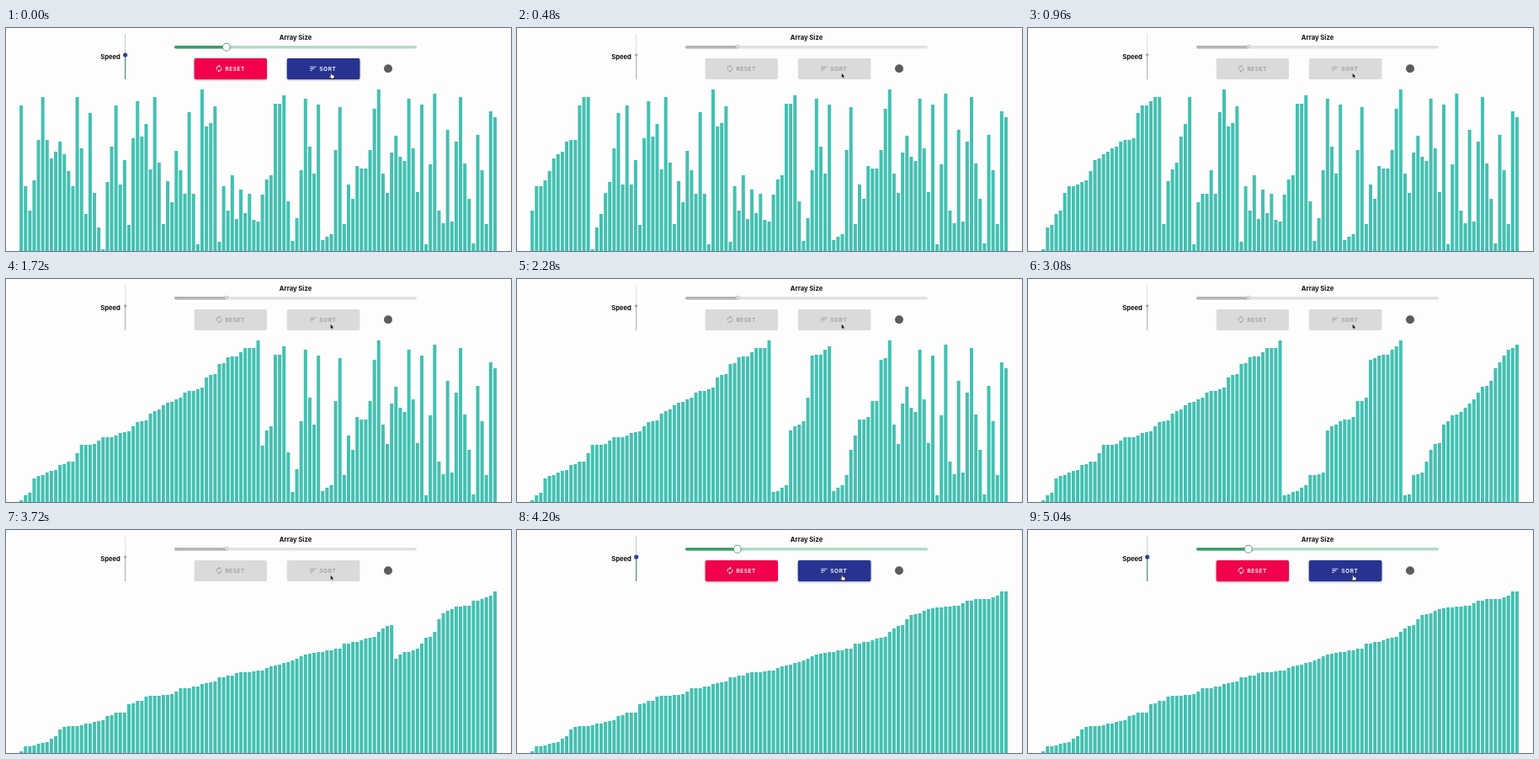
Animation, 600 px wide and 265 px high, one loop 5080 ms. Source, as an HTML page:

```html
<!DOCTYPE html>
<html lang="en">
<head>
<meta charset="utf-8">
<title>Merge sort</title>
<style>
  html, body { margin: 0; width: 100%; height: 100%; overflow: hidden; background: #fdfdfd; }
  svg { display: block; width: 100vw; height: 100vh; }
  text { font-family: Inter, Roboto, sans-serif; }
  .label { font-weight: 700; font-size: 7.65px; fill: #111; text-anchor: middle; }
  .caption { font-weight: 600; font-size: 6.6px; letter-spacing: .5px; }
  .raised { filter: drop-shadow(0 1px 1px #0005); }
</style>
</head>
<body>
<svg viewBox="0 0 600 265">
  <defs>
    <path id="renew" transform="translate(248 43.2) scale(.42)" d="M12 6v3l4-4-4-4v3c-4.42 0-8 3.58-8 8 0 1.57.46 3.03 1.24 4.26L6.7 14.8c-.45-.83-.7-1.79-.7-2.8 0-3.31 2.69-6 6-6zm6.76 1.74L17.3 9.2c.44.84.7 1.79.7 2.8 0 3.31-2.69 6-6 6v-3l-4 4 4 4v-3c4.42 0 8-3.58 8-8 0-1.57-.46-3.03-1.24-4.26z"/>
    <path id="lines" transform="translate(360 43.2) scale(.42)" d="M3 18h6v-2H3v2zM3 6v2h18V6H3zm0 7h12v-2H3v2z"/>
    <rect id="resetBox" x="223.7" y="36" width="86.3" height="25" rx="2"/>
    <rect id="sortBox" x="333.8" y="36" width="86.6" height="25" rx="2"/>
    <g id="captions">
      <use href="#renew"/><text class="caption" x="260.5" y="50.8">RESET</text>
      <use href="#lines"/><text class="caption" x="372.3" y="50.8">SORT</text>
    </g>
  </defs>

  <g id="bars"></g>

  <text class="label" x="124" y="36.8">Speed</text>
  <text class="label" x="344" y="14.4">Array Size</text>
  <circle cx="454" cy="48.3" r="5" fill="#5b5b60"/>

  <g fill="#dadada">
    <use href="#resetBox"/><use href="#sortBox"/>
    <use href="#captions" fill="#9c9c9c"/>
  </g>
  <g id="activeButtons">
    <use href="#resetBox" class="raised" fill="#f1004c"/>
    <use href="#sortBox" class="raised" fill="#283391"/>
    <use href="#captions" fill="#fff"/>
  </g>

  <g id="idle">
    <rect x="200" y="21" width="288" height="3.4" rx="1.7" fill="#afdcc5"/>
    <rect x="200" y="21" width="62" height="3.4" rx="1.7" fill="#3c9b69"/>
    <circle cx="261.8" cy="22.7" r="4.5" fill="#fff" stroke="#5f9f80" stroke-width="1.1"/>
    <path d="M141.7 7V32" stroke="#b9cfc6"/>
    <path d="M141.7 32V61" stroke="#4f8a72" stroke-width="1.2"/>
    <circle cx="141.7" cy="32" r="2.6" fill="#2c3f9c"/>
    <path d="M385.2 53.6q.9-.6 1.3.3l.6 1.6 2.2.7q1 .4.7 1.6l-.5 2.2h-3.2l-2.2-2.6q0-.9 1-.5l.7.5z" fill="#fff" stroke="#111" stroke-width=".6"/>
  </g>
  <g id="busy">
    <rect x="200" y="21" width="288" height="3.4" rx="1.7" fill="#e1e1e1"/>
    <rect x="200" y="21" width="62" height="3.4" rx="1.7" fill="#b4b4b4"/>
    <circle cx="261.8" cy="22" r="1.8" fill="#fff" stroke="#b0b0b0" stroke-width=".9"/>
    <path d="M141.7 7V32" stroke="#dedede"/>
    <path d="M141.7 32V61" stroke="#b4b4b4" stroke-width="1.2"/>
    <circle cx="141.7" cy="32" r="1.7" fill="#a8a8a8"/>
    <path d="M385.6 53.6v5.6l1.3-1.1.9 2 1-.5-.9-1.9h1.6z" fill="#111" stroke="#fff" stroke-width=".3"/>
  </g>
</svg>
<script>
const LOOP = 5080, PRESS = 40, SORT_START = 83, SORT_END = 3840, FADE = 250;
const TEAL = '#43c0b1', YELLOW = '#fcca58';

// Top edge of every bar before sorting; a larger value is a shorter bar.
const tops = [
  92, 188, 217, 181, 133, 82, 133, 155, 147, 135, 150, 170, 188, 82, 143, 221, 101, 196, 237,
  263, 183, 141, 92, 186, 157, 234, 131, 87, 129, 114, 168, 82, 160, 233, 182, 207, 146, 169,
  197, 100, 197, 257, 73, 117, 113, 93, 254, 188, 217, 175, 227, 192, 220, 197, 228, 230, 198,
  180, 175, 90, 90, 80, 206, 253, 226, 169, 84, 141, 173, 91, 252, 248, 245, 145, 94, 233, 186,
  203, 164, 167, 167, 145, 96, 73, 173, 196, 148, 128, 153, 158, 84, 143, 195, 91, 257, 162, 78,
  217, 232, 121, 230, 135, 82, 161, 203, 256, 127, 169, 233, 99, 106
];

// Each step compares bars i and j, then writes a value at k.
const steps = [];
function mergeSort(list, from, to) {
  if (from === to) return;
  const mid = (from + to) >> 1;
  mergeSort(list, from, mid);
  mergeSort(list, mid + 1, to);
  const copy = list.slice();
  let i = from, j = mid + 1;
  for (let k = from; k <= to; k++) {
    const leftOpen = i <= mid, rightOpen = j <= to;
    const takeLeft = leftOpen && (!rightOpen || copy[i] >= copy[j]);
    const pair = [leftOpen ? i : j, rightOpen ? j : i];
    list[k] = copy[takeLeft ? i++ : j++];
    steps.push({ pair, k, value: list[k] });
  }
}
mergeSort(tops.slice(), 0, tops.length - 1);

const byId = id => document.getElementById(id);
const bars = tops.map((_, i) => {
  const bar = document.createElementNS('http://www.w3.org/2000/svg', 'rect');
  bar.setAttribute('x', 16.1 + 5.117 * i);
  bar.setAttribute('width', 4);
  return byId('bars').appendChild(bar);
});

function drawBars(t) {
  const u = Math.max(0, t - SORT_START);
  const progress = Math.min(steps.length, 0.19742 * u + 1.333e-6 * u * u);
  const current = Math.floor(progress), phase = progress - current;
  const written = current + (phase >= 2 / 3 ? 1 : 0);
  const now = tops.slice();
  for (let s = 0; s < written; s++) now[steps[s].k] = steps[s].value;
  const lit = u > 0 && current < steps.length && phase < 1 / 3 ? steps[current].pair : [];
  bars.forEach((bar, i) => {
    bar.setAttribute('y', now[i]);
    bar.setAttribute('height', 265 - now[i]);
    bar.setAttribute('fill', lit.includes(i) ? YELLOW : TEAL);
  });
}

const ramp = (t, start) => Math.min(1, Math.max(0, (t - start) / FADE));
const ease = x => x * x * (3 - 2 * x);

function frame(ms) {
  const t = ms % LOOP;
  const busy = t >= PRESS && t < SORT_END;
  drawBars(t);
  byId('idle').style.display = busy ? 'none' : '';
  byId('busy').style.display = busy ? '' : 'none';
  byId('activeButtons').style.opacity = 1 - ease(ramp(t, PRESS)) + ease(ramp(t, SORT_END));
  requestAnimationFrame(tick);
}
const begin = performance.now();
const tick = () => frame(performance.now() - begin);
tick();
</script>
</body>
</html>
```
